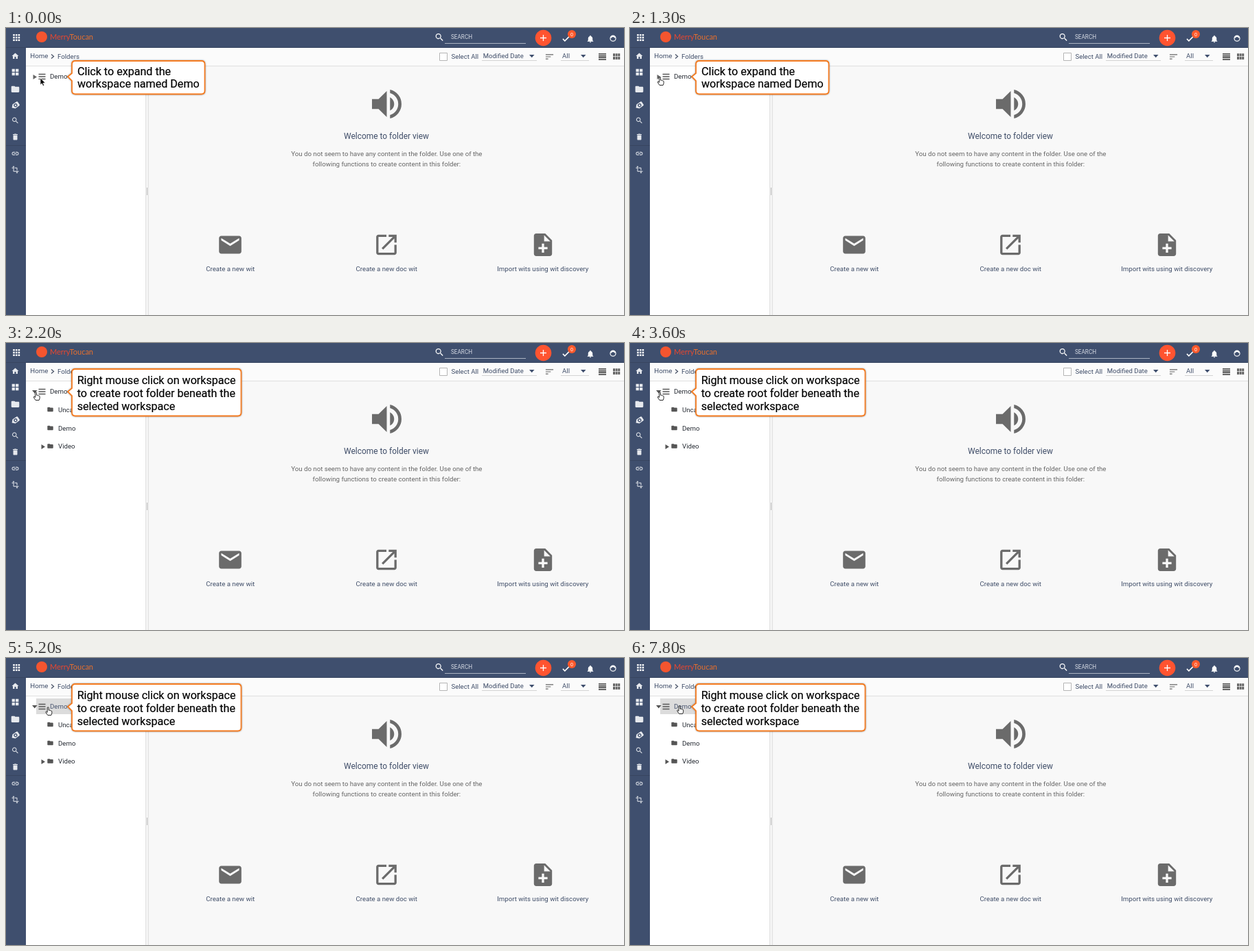
An HTML page for the animation above (8 s loop, 900 px wide and 419 px high).

```html
<!DOCTYPE html>
<html lang="en">
<head>
<meta charset="utf-8">
<title>Folder view</title>
<style>
html, body { margin: 0; width: 100%; height: 100%; overflow: hidden; background: #f8f8f8; }
svg { display: block; width: 100%; height: 100%; }
text { font: 9.66px Roboto, sans-serif; fill: #3f4d68; }
.mid { text-anchor: middle; }
.tree text { fill: #262b33; }
.tree .hover { fill: #4a5670; }
.callout text { font-size: 16.1px; fill: #000; stroke: #000; stroke-width: .2; }
.callout path { fill: #fff; stroke: #f47b20; stroke-width: 1.8; filter: drop-shadow(.5px .7px 1px #0006); }
.logo { font: 11px Lato, sans-serif; }
</style>
</head>
<body>
<svg viewBox="0 0 900 419" preserveAspectRatio="none">
  <!-- panels -->
  <path fill="#f8f8f8" d="M0 0h900v419H0z"/>
  <path fill="#fff" d="M29 55h175v364H29z"/>
  <path fill="#fbfbfb" d="M29 28h871v27H29z"/>
  <path fill="#f4f4f4" d="M204 56h4v363h-4z"/>
  <path fill="none" stroke="#e0e0e0" d="M29 55.5h871M203.5 56v363M207.5 56v363"/>
  <path stroke="#b5b5b5" d="M205.5 233v11"/>
  <path fill="#3f4f6e" d="M0 0h900v29H29v390H0z"/>
  <path stroke="#374560" d="M0 28.500h900M0 171.500h29"/>

  <!-- header -->
  <circle cx="52" cy="13" r="8" fill="#f4552f"/>
  <text class="logo" x="64" y="17" style="fill:#e9472f">Merry<tspan fill="#e8702e">Toucan</tspan></text>
  <text x="648" y="16" style="font-size:8.2px;fill:#d5dae3">SEARCH</text>
  <path stroke="#aab3c2" d="M639 22.5h118"/>
  <circle cx="782.5" cy="14.5" r="11.8" fill="#ff5430"/>
  <path stroke="#fff" stroke-width="1.3" d="M778 14.5h9M782.5 10v9"/>
  <g fill="none" stroke="#fff">
    <circle cx="884" cy="15.2" r="4" stroke-width="1.2"/>
    <path stroke-width="2" d="M880.5 14q3.5-4 7 0"/>
  </g>

  <!-- toolbar -->
  <text x="35.3" y="44.2">Home</text>
  <text x="75" y="44.8">Folders</text>
  <path fill="none" stroke="#4a5468" stroke-width="1.3" d="M66 38.5l3.5 3-3.500 3"/>
  <path fill="#fff" stroke="#b5b5b5" d="M631.5 36.5h11v11h-11z"/>
  <text x="648.5" y="44.9" style="font-size:9.6px">Select All</text>
  <text x="694.8" y="43.7" style="font-size:9.5px">Modified Date</text>
  <text x="810" y="43.7">All</text>
  <path stroke="#d3d3d3" d="M693 47.5h80M808 47.5h41"/>
  <path fill="#3f4f6e" d="M762 39h7.5l-3.75 4.3zM837 39h7.5l-3.75 4.3z"/>
  <path stroke="#333" stroke-width="1.5" d="M863 38h11M863 40.7h11M863 43.3h11M863 46h11"/>

  <!-- empty folder -->
  <text class="mid" x="554" y="162" style="font-size:11.95px">Welcome to folder view</text>
  <g class="mid">
    <text x="554.4" y="187.4" style="fill:#666">You do not seem to have any content in the folder. Use one of the</text>
    <text x="554.4" y="201.8" style="fill:#666">following functions to create content in this folder:</text>
    <text x="326.7" y="355.1">Create a new wit</text>
    <text x="554.3" y="355.1">Create a new doc wit</text>
    <text x="781.7" y="355.1">Import wits using wit discovery</text>
  </g>
  <g id="icons"></g>
  <circle cx="824" cy="9" r="6" fill="#ff5a2c"/>
  <text class="mid" x="824" y="11.5" style="font-size:7px;fill:#fff">0</text>

  <!-- workspace tree -->
  <g class="tree">
    <path id="highlight" fill="#dcdcdc" d="M44 59h159v23H44z"/>
    <path stroke="#555" stroke-width="1.4" d="M47.5 67.5h10M47.5 71h10M47.5 74.5h10"/>
    <text id="workspace" x="64" y="74">Demo</text>
    <path id="closedMark" fill="#666" d="M39.5 68l5.5 3.5-5.5 3.5z"/>
    <g id="children">
      <path fill="#555" d="M38 69h7.5l-3.75 4.5zM51.5 148l5.5 3.5-5.5 3.5z"/>
      <text x="76" y="101">Uncategorized</text>
      <text x="76" y="127.5">Demo</text>
      <text x="76" y="154">Video</text>
    </g>
  </g>

  <g class="callout" id="expandTip">
    <path d="M101 48h183.5q5 0 5 5v38.500q0 5-5 5h-183.500q-5 0-5-5v-14.500l-6-6 6-5v-13q0-5 5-5z"/>
    <text x="104" y="68.700">Click to expand the</text>
    <text x="104" y="87.300">workspace named Demo</text>
  </g>
  <g class="callout" id="createTip">
    <path d="M101 38h236.500q5 0 5 5v58.500q0 5-5 5h-236.500q-5 0-5-5v-24.500l-6-6 6-5v-23q0-5 5-5z"/>
    <text x="103.700" y="59.500">Right mouse click on workspace</text>
    <text x="103.700" y="78.500">to create root folder beneath the</text>
    <text x="103.700" y="97.500">selected workspace</text>
  </g>

  <!-- pointers, hot spot at 0,0 -->
  <path id="arrow" stroke="#fff" stroke-width=".7" d="M0 0v10l2.3-2.1 1.6 3.6 1.7-.7-1.6-3.5h3.2z"/>
  <path id="hand" fill="#fff" stroke="#111" stroke-width=".9" stroke-linejoin="round"
    d="M-1 1q0-1 1-1t1 1v3.5q1.3-.6 1.7.4 1.3-.5 1.6.5 1.3-.2 1.3 1v2.6l-1 2.7h-5l-2.6-3.7q-.8-1.5.3-1.7l1.7 1.3z"/>
</svg>
<script>
const shapes = {
  home: 'M10 20v-6h4v6h5v-8h3L12 3 2 12h3v8z',
  widgets: 'M3 3h8v8H3zM13 3h8v8h-8zM3 13h8v8H3zM13 13h8v8h-8z',
  folder: 'M10 4H4c-1.1 0-2 .9-2 2v12c0 1.1.9 2 2 2h16c1.1 0 2-.9 2-2V8c0-1.1-.9-2-2-2h-8z',
  tag: 'M0 12L7 5h13q3 0 3 3v8q0 3-3 3H7zM7.500 12a5 5 0 0 0 10 0a5 5 0 0 0-10 0M10 12a2.500 2.500 0 0 1 5 0a2.500 2.500 0 0 1-5 0',
  search: 'M15.5 14h-.8l-.3-.3A6.5 6.5 0 1 0 13.7 14.4l.3.3v.8l5 5 1.5-1.5zM9.5 14a4.5 4.5 0 1 1 0-9 4.5 4.5 0 0 1 0 9z',
  trash: 'M6 19c0 1.1.9 2 2 2h8c1.1 0 2-.9 2-2V7H6zM19 4h-3.5l-1-1h-5l-1 1H5v2h14z',
  link: 'M3.9 12A3.1 3.1 0 0 1 7 8.9h4V7H7a5 5 0 0 0 0 10h4v-1.9H7A3.1 3.1 0 0 1 3.9 12zM8 13h8v-2H8zM17 7h-4v1.9h4a3.1 3.1 0 0 1 0 6.2h-4V17h4a5 5 0 0 0 0-10z',
  transform: 'M22 18v-2H8V4h2L7 1 4 4h2v2H2v2h4v8c0 1.1.9 2 2 2h8v2h-2l3 3 3-3h-2v-2zM10 8h6v6h2V8c0-1.1-.9-2-2-2h-6z',
  check: 'M9 15.5L4.8 11.3 2.7 13.4 9 19.7 21.7 7 19.6 4.9z',
  bell: 'M12 22c1.1 0 2-.9 2-2h-4c0 1.1.9 2 2 2zM18 16v-5c0-3.07-1.64-5.64-4.5-6.32V4a1.5 1.5 0 0 0-3 0v.68C7.63 5.36 6 7.92 6 11v5l-2 2v1h16v-1z',
  sort: 'M3 18h6v-2H3zM3 6v2h18V6zM3 13h12v-2H3z',
  speaker: 'M3 9v6h4l5 5V4L7 9zM16.5 12c0-1.77-1.02-3.29-2.5-4.03v8.05c1.48-.73 2.5-2.25 2.5-4.02zM14 3.23v2.06a7 7 0 0 1 0 13.42v2.06a9 9 0 0 0 0-17.54z',
  mail: 'M20 4H4c-1.1 0-2 .9-2 2v12c0 1.1.9 2 2 2h16c1.1 0 2-.9 2-2V6c0-1.1-.9-2-2-2zM20 8l-8 5-8-5V6l8 5 8-5z',
  open: 'M19 19H5V5h7V3H5c-1.1 0-2 .9-2 2v14c0 1.1.89 2 2 2h14c1.1 0 2-.9 2-2v-7h-2zM14 3v2h3.6l-9.84 9.83 1.41 1.41L19 6.41V10h2V3z',
  note: 'M14 2H6c-1.1 0-2 .9-2 2v16c0 1.1.9 2 2 2h12c1.1 0 2-.9 2-2V8zM16 16h-3v3h-2v-3H8v-2h3v-3h2v3h3zM13 9V3.5L18.5 9z'
};
const $ = id => document.getElementById(id);

function addPath(parent, d, fill, transform = '') {
  const path = document.createElementNS('http://www.w3.org/2000/svg', 'path');
  for (const [key, value] of Object.entries({ d, fill, transform, 'fill-rule': 'evenodd' }))
    path.setAttribute(key, value);
  parent.append(path);
}

function icon(name, x, y, scale, fill, { parent = $('icons'), angle = 0 } = {}) {
  addPath(parent, shapes[name], fill,
    `translate(${x} ${y}) rotate(${angle}) scale(${scale}) translate(-12 -12)`);
}

function squares(x, y, cols, rows, step, w, h, fill) {
  let d = '';
  for (let i = 0; i < cols * rows; i++)
    d += `M${x + i % cols * step} ${y + Math.floor(i / cols) * (h + step - w)}h${w}v${h}h${-w}z`;
  addPath($('icons'), d, fill);
}

squares(10.3, 9, 3, 3, 3.7, 2.5, 2.5, '#fff');
squares(884, 37.3, 3, 2, 3.6, 3, 4, '#666');

const side = '#e6e9ee';
icon('home', 13.5, 41, .5, side);
icon('widgets', 13.5, 64.5, .54, side);
icon('folder', 13.5, 89.3, .58, side);
icon('tag', 13.7, 113, .52, side, { angle: -35 });
icon('search', 13.5, 135, .5, side);
icon('trash', 13.5, 159, .5, side);
icon('link', 13.5, 183.3, .5, side);
icon('transform', 13.5, 206.8, .5, side);

icon('search', 631.3, 13.6, .63, '#fff');
icon('check', 815.5, 15.7, .55, '#fff');
icon('bell', 851, 16, .54, '#fff');
icon('sort', 791.5, 42, .62, '#666');
icon('speaker', 554.5, 111, 2.39, '#6b6b6b');
icon('mail', 326.5, 316.5, 1.63, '#6b6b6b');
icon('open', 554, 316.5, 1.65, '#6b6b6b');
icon('note', 782, 316.5, 1.65, '#6b6b6b');
for (const y of [97, 124, 150.5]) icon('folder', 64.5, y, .42, '#555', { parent: $('children') });

const progress = (t, from, to) => Math.min(1, Math.max(0, (t - from) / (to - from)));
const show = (id, on) => { $(id).style.display = on ? '' : 'none'; };
const place = (id, x, y) => $(id).setAttribute('transform', `translate(${x} ${y})`);

function draw() {
  const now = performance.now() % 8000;
  const tick = now < 2200 ? 100 : 200;
  const t = Math.floor(now / tick) * tick;
  const expanded = t >= 2200, hovered = t >= 4800, pointing = t >= 1200;

  show('expandTip', !expanded);
  show('closedMark', !expanded);
  show('createTip', expanded);
  show('children', expanded);
  show('highlight', hovered);
  $('workspace').classList.toggle('hover', hovered);
  show('arrow', !pointing);
  show('hand', pointing);

  const approach = progress(t, 0, 600);
  place('arrow', 50 - 7.3 * approach, 73 - approach);
  const slide = 1 - (1 - progress(t, 4600, 5800)) ** 1.4;
  place('hand', 43.5 + 28.5 * slide, 71.8 - 2 * progress(t, 5200, 5800));
  requestAnimationFrame(draw);
}
draw();
</script>
</body>
</html>
```
